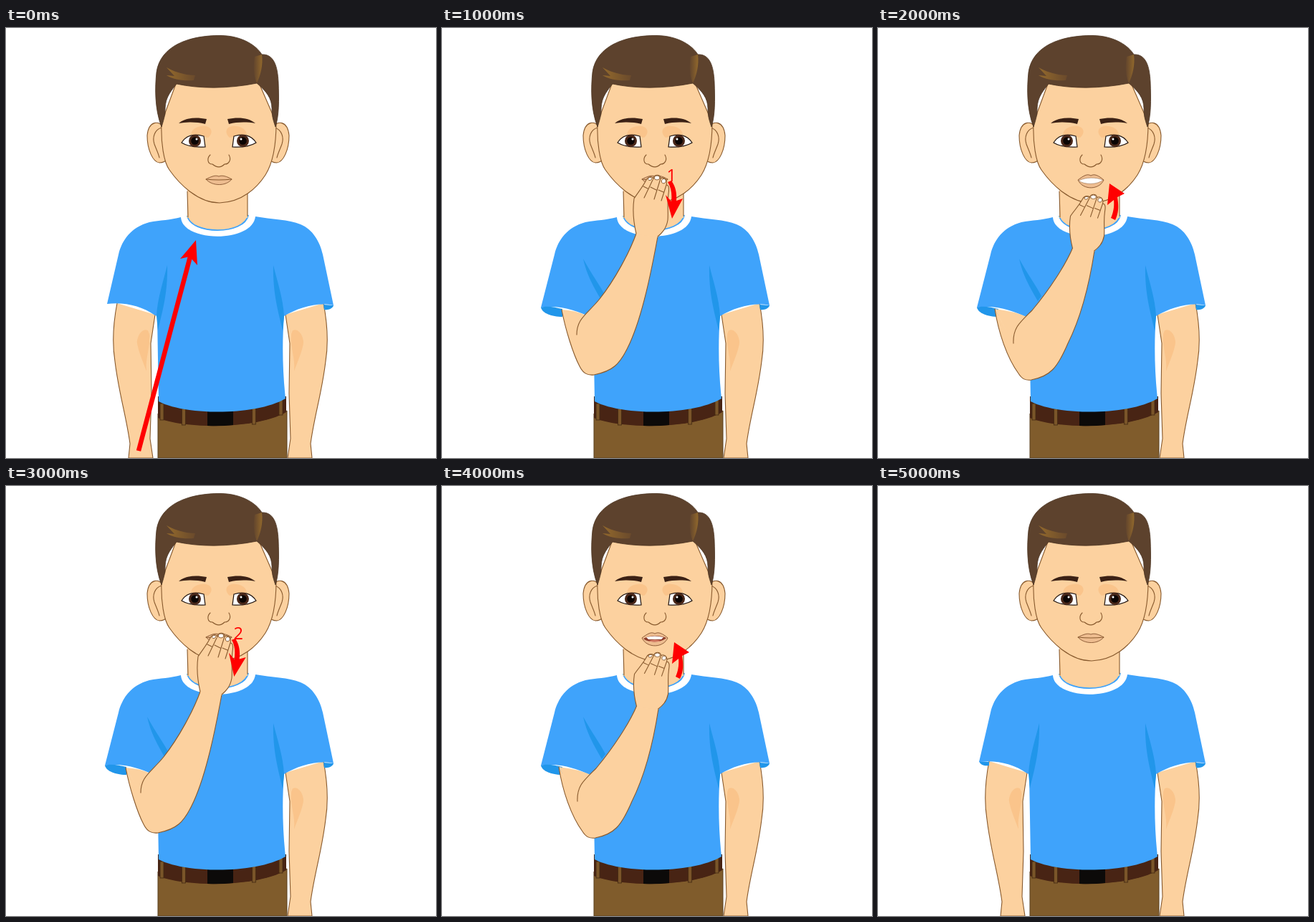
An HTML page for the animation above (6 s loop, 600 by 600 pixels).

```html
<!DOCTYPE html>
<html lang="en">
<head>
<meta charset="utf-8">
<title>Hand to mouth sign</title>
<style>
html, body { margin: 0; width: 100%; height: 100%; overflow: hidden; background: #fff; }
svg { display: block; width: 100%; height: 100%; }
.skin { fill: #fcd19f; }
.line { stroke: #87592d; stroke-width: 1.1; stroke-linejoin: round; stroke-linecap: round; }
.open { fill: none; }
.shade { fill: #fac48b; }
.shirt { fill: #3fa3fb; }
.fold { fill: #2196ea; }
.lip { fill: #eebd90; stroke: #8f5e38; }
.red { fill: #f00; }
text { font: 23.5px "Open Sans", sans-serif; }
</style>
</head>
<body>
<svg viewBox="0 0 600 600">
  <defs>
    <linearGradient id="goldLeft">
      <stop offset="0" stop-color="#93692c"/><stop offset="1" stop-color="#6a4a2c"/>
    </linearGradient>
    <linearGradient id="goldRight">
      <stop offset="0" stop-color="#62452d"/><stop offset="1" stop-color="#91682c"/>
    </linearGradient>
    <g id="restingArm">
      <path class="skin line" d="M155 384C150 410 148 440 152 465C157 508 168 542 173 580L171 600H205L201 573L203 510L202 440L208 400"/>
      <path class="shade" d="M198 422C188 418 182 434 183 440C185 452 191 465 196 479C194 460 202 445 200 427Z"/>
    </g>
    <path id="fold" class="fold" d="M225 331C220 352 211 378 210 402L212 422C218 396 226 370 225 331Z"/>
    <g id="ear">
      <path class="skin line" d="M221 140C214 128 199 129 197 150C197 170 205 187 214 188C220 188 223 186 225 182"/>
      <path class="open line" d="M217 139C207 142 204 153 207 162C210 170 213 176 214 181"/>
    </g>
    <g id="eye">
      <path class="shade" d="M258 148C260 139 270 136 279 137C288 139 289 147 282 153Z"/>
      <path fill="#fff" stroke="#20130d" stroke-width="1.2" d="M245 160C252 149 264 147 276 151L278 166C262 167 253 165 245 160Z"/>
      <circle cx="263.5" cy="157.5" r="8.5" fill="#492719"/>
      <circle cx="263.5" cy="157.5" r="5.3" fill="#0b0504"/>
    </g>
    <path id="brow" fill="#3b2115" d="M241 133C250 125 265 124 280 127L278 134C266 131 253 131 241 133Z"/>
    <g id="hand">
      <path class="skin" d="M271 288C267 270 266 252 268 238C273 230 280 222 285 212C288 206 295 207 295 211C295 204 305 203 305 210C309 207 315 211 313 219C317 219 317 225 316 231C314 246 316 258 315 268C313 280 307 286 301 292Z"/>
      <path class="open line" d="M271 287C267 270 266 252 268 238C273 230 280 222 285 212C288 206 295 207 295 211C295 204 305 203 305 210C309 207 315 211 313 219C317 219 317 225 316 231C314 246 316 258 315 268C313 280 307 286 301 291
        M294 212L282 237M305 210L296 239M313 219L306 241M281 221L287 224M291 222L299 226M302 226L309 229"/>
      <g fill="#fff" stroke="#87592d" stroke-width=".9">
        <ellipse cx="290" cy="210.5" rx="2.8" ry="2" transform="rotate(-20 290 210)"/>
        <ellipse cx="300" cy="209" rx="3.8" ry="3"/>
        <ellipse cx="309.5" cy="213.5" rx="3" ry="3.3" transform="rotate(20 309 213)"/>
      </g>
    </g>
    <g id="openLips">
      <path class="lip" d="M279 212C287 206 292 203 297 206C302 203 308 206 315 212C309 226 286 227 279 212Z"/>
    </g>
  </defs>

  <!-- trousers and belt -->
  <path fill="#805c2c" stroke="#5b401f" d="M212 538V600H392V534C350 560 250 560 212 538Z"/>
  <path fill="#482414" d="M212 514V544C250 560 350 560 391 536V514Z"/>
  <path fill="#0c0a09" d="M281 533H317V554Q299 556 281 555Z"/>
  <g fill="#7a5529" stroke="#432a12" stroke-width=".8">
    <rect x="215" y="524" width="5" height="23"/>
    <rect x="245.500" y="531" width="5" height="23"/>
    <rect x="343.500" y="530" width="5" height="23"/>
    <rect x="381" y="517" width="5" height="23"/>
  </g>

  <!-- arms hanging behind the sleeves -->
  <use href="#restingArm" transform="matrix(-1 0 0 1 598 0)"/>
  <use href="#restingArm" data-on="0 5"/>
  <path class="fold" d="M443 386L457 387C456 391 450 394 444 393Z"/>
  <path class="fold" data-on="5" d="M141 384C143 390 150 391 155 390V385Z"/>

  <g id="shirts"></g>
  <use href="#fold" transform="matrix(-1 0 0 1 598 0)"/>
  <use href="#fold" data-on="0 5"/>
  <g data-on="1 2 3 4" class="fold">
    <path d="M197 322C209 344 221 360 228 374L223 381C211 360 202 345 197 322Z"/>
    <path d="M138 390C147 387 158 390 168 392V403C153 403 140 398 138 390Z"/>
  </g>

  <!-- neck and collar -->
  <path fill="#fff" d="M244 264C246 300 346 300 348 262L338 260H253Z"/>
  <path class="skin" stroke="#3fa3fb" stroke-width="1.800" d="M253 262C258 289 333 289 338 261"/>
  <path class="skin" d="M253 220V265H337V220Z"/>
  <path class="open line" d="M253 228L254 264M337 226V262"/>

  <!-- head -->
  <use href="#ear"/>
  <use href="#ear" transform="matrix(-1 0 0 1 592 0)"/>
  <path class="skin line" d="M217 132C216 160 220 187 228 198C242 218 268 244 298 244C330 243 351 222 362 205C372 189 377 165 377 132L350 70H240Z"/>
  <path fill="#5d422d" stroke="#49321f" stroke-width=".8" d="M217 138C207 112 208 82 210 62C215 25 255 10 300 10.500C330 11 350 25 357 37C374 36 379 54 380 75C381 102 381 122 376 138C372 126 371 122 371 112C371 98 363 88 350 77C310 85 270 85 238 78C222 97 222 105 222 120C220 128 219 132 217 138Z"/>
  <path fill="url(#goldLeft)" d="M224 55C236 62 252 66 264 66L262 73C246 74 234 72 224 66L235 67Z"/>
  <path fill="url(#goldRight)" d="M347 40L357 37C359 52 355 66 350 77C345 65 345 52 347 40Z"/>
  <use href="#eye"/>
  <use href="#eye" transform="matrix(-1 0 0 1 594 0)"/>
  <g fill="#fff"><circle cx="266" cy="155" r="1.500"/><circle cx="328" cy="155" r="1.500"/></g>
  <use href="#brow"/>
  <use href="#brow" transform="matrix(-1 0 0 1 589 0)"/>
  <path class="open line" d="M285 177C280 182 281 190 288 190C294 195 300 195 305 190C311 190 315 184 311 177"/>

  <!-- mouths -->
  <g data-on="0 1 3 5">
    <path class="lip" d="M279 211C287 207 292 205 297 207C302 205 308 207 315 211C307 221 288 221 279 211Z"/>
    <path class="open line" d="M279 211Q297 213 315 211"/>
  </g>
  <g data-on="2">
    <use href="#openLips"/>
    <path fill="#fff" stroke="#9b714d" stroke-width=".6" d="M280 213C290 208 304 208 314 212C306 219 288 219 280 213Z"/>
  </g>
  <g data-on="4">
    <use href="#openLips"/>
    <path fill="#8c3d2b" d="M281 213C290 208 304 208 313 212C306 219 288 219 281 213Z"/>
    <path fill="#fff" d="M285 211Q297 208 309 211L306 214H288Z"/>
    <path fill="#d77f69" d="M288 216Q297 213 306 216Q297 219 288 216Z"/>
  </g>

  <g id="raisedArms"></g>

  <!-- arrows and counts -->
  <g data-on="0" class="red">
    <path stroke="#f00" stroke-width="6.500" d="M185 590L257 319"/>
    <path d="M265 296L243 322L256 319L267 331Z"/>
  </g>
  <g class="red">
    <g data-on="1 3"><path id="downArrow" d="M315 215C320 223 321 232 320 242L312 233L321 266L336 238L327 241C328 228 325 220 320 213Z"/></g>
    <path id="upArrow" data-on="2 4" d="M323 217L320 247L329 240C330 250 328 258 325 265L331 268C336 258 336 248 334 236L344 231Z"/>
    <text data-on="1" x="313.500" y="214">1</text>
    <text data-on="3" x="317.500" y="214">2</text>
  </g>
</svg>
<script>
const STEP = 1000, STEPS = 6;
const find = id => document.getElementById(id);

const shirt = (on, leftSleeve) => `<path class="shirt" data-on="${on}" d="M348 263C370 267 395 267 411 274C428 281 438 298 442 316
  L457 387C435 382 408 390 388 402C385 440 386 480 390 517C350 541 250 541 213 521L211 402${leftSleeve}
  L157 316C162 295 175 278 200 271C215 268 230 268 244 264C260 292 335 292 348 263Z"/>`;

// The outer edge runs from sleeve to wrist, the inner edge from wrist to elbow crease.
const raisedArm = (on, hem, outer, inner, hand) => `<g data-on="${on}">
  <path class="skin" d="${hem}"/>
  <path class="skin" d="M${outer}L${inner}Z"/>
  <path class="open line" d="M${outer}M${inner}"/>
  <use href="#hand" transform="${hand}"/></g>`;

find('shirts').innerHTML =
  shirt('0 5', 'L208 401C190 388 165 382 141 385') +
  shirt('1 2 3 4', 'L208 404C190 395 165 386 138 390');

find('raisedArms').innerHTML =
  raisedArm('1 3', 'M167 393Q186 394 201 401L188 430Z',
    '167 393C172 420 183 455 192 472C197 482 203 485 212 484C237 479 248 471 262 440C280 400 292 340 301 291',
    '271 287C262 312 242 350 220 378C202 400 188 405 188 428', '') +
  raisedArm('2 4', 'M163 392Q190 395 210 404L189 442Z',
    '163 392C168 425 180 460 196 482C201 490 206 492 214 491C240 486 250 475 265 440C285 400 296 350 302 311',
    '272 306C262 330 240 364 215 394C198 411 188 418 189 440', 'matrix(1 0 0 .92 .5 43.5)');

const parts = [...document.querySelectorAll('[data-on]')]
  .map(node => ({ node, steps: node.dataset.on.split(' ').map(Number) }));
let shown = -1;

function draw(now) {
  const step = Math.floor(now / STEP) % STEPS;
  if (step !== shown) {
    shown = step;
    for (const { node, steps } of parts) node.style.display = steps.includes(step) ? '' : 'none';
    find('downArrow').setAttribute('transform', step === 3 ? 'rotate(3 318 214)' : '');
    find('upArrow').setAttribute('transform', step === 4 ? 'translate(1 1)' : '');
  }
}

const start = performance.now();
function tick() {
  draw(performance.now() - start);
  requestAnimationFrame(tick);
}
tick();
</script>
</body>
</html>
```
